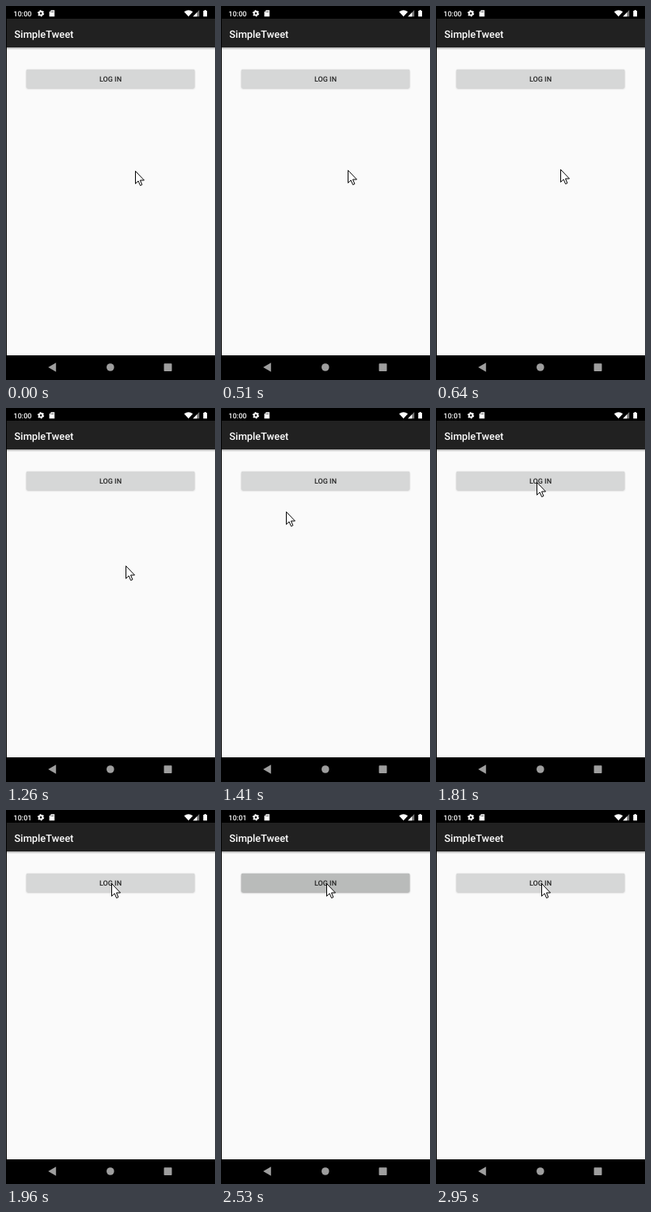
An HTML page for the animation above (8000 ms loop, 264 px wide and 470 px high).

```html
<!DOCTYPE html>
<html lang="en">
<head>
<meta charset="utf-8">
<title>Login screen</title>
<style>
  html, body { margin: 0; width: 100%; height: 100%; overflow: hidden; background: #000; }
  svg { display: block; width: 100%; height: 100%; }
  text { font-family: Roboto, sans-serif; font-weight: 500; text-rendering: geometricPrecision; }
</style>
</head>
<body>
<svg viewBox="0 0 264 470">
  <defs>
    <linearGradient id="barShadow" x2="0" y2="1">
      <stop stop-color="#000" stop-opacity=".32"/>
      <stop offset="1" stop-color="#000" stop-opacity="0"/>
    </linearGradient>
    <filter id="blur" x="-10%" y="-50%" width="120%" height="200%">
      <feGaussianBlur stdDeviation="1"/>
    </filter>
  </defs>

  <rect width="264" height="470"/>
  <rect x="1" y="52" width="263" height="387" fill="#fafafa"/>
  <rect x="1" y="16" width="263" height="36" fill="#212121"/>
  <rect x="1" y="52" width="263" height="3" fill="url(#barShadow)"/>

  <!-- status bar -->
  <g fill="#fff">
    <text id="clock" x="9.6" y="12.6" font-size="9"></text>
    <circle cx="44" cy="9.3" r="2.3" fill="none" stroke="#fff" stroke-width="1.9"/>
    <circle cx="44" cy="9.3" r="3.6" fill="none" stroke="#fff" stroke-width="1.2" stroke-dasharray="1.9 1.87"/>
    <path d="M57 5.3h4.3v7.9h-6.6v-5.4z"/>
    <path d="M56.8 6.6v1.6M58.3 6.6v1.6M59.8 6.6v1.6" stroke="#000" stroke-width=".6"/>
    <path d="M225 7.2Q230.5 3.2 236 7.2L230.5 13.3z"/>
    <path d="M244.2 5v8.2h-8z" fill="#777"/>
    <path d="M241.3 8v5.2h-5.1z"/>
    <path d="M249.2 6h1.4v-1h2v1h1.4v7.3h-4.8z"/>
    <text x="10.6" y="39.8" font-size="12.85">SimpleTweet</text>
  </g>

  <!-- button -->
  <rect id="shadow" x="26" y="80.8" width="212" height="23" rx="1.3" filter="url(#blur)"/>
  <rect id="button" x="25.7" y="79.7" width="212.6" height="23.3" rx="1.3"/>
  <text x="132" y="94.6" font-size="9" fill="#222" text-anchor="middle">LOG IN</text>

  <!-- navigation bar -->
  <g fill="#9e9e9e">
    <path d="M53.3 454L63.2 448.3v11.4z"/>
    <circle cx="131.8" cy="454" r="4.8"/>
    <rect x="199.5" y="449.2" width="10" height="9.8" rx=".7"/>
  </g>

  <path id="cursor" d="M.5.5v15.8l3.6-3.4 2.5 5.7 2.3-1-2.4-5.6h5z" fill="#fff" stroke="#000" stroke-width="1"/>
</svg>
<script>
  const LOOP = 8000;
  const el = id => document.getElementById(id);

  // Each entry: start time in ms, then the values held from then on
  const cursorSteps = [
    [0, 163, 207], [510, 160, 206], [640, 157, 205], [1260, 151, 198],
    [1410, 82, 130], [1560, 84, 115], [1690, 106, 103], [1810, 127, 93], [1960, 133, 92]
  ];
  const clockSteps = [[0, '10:00'], [1560, '10:01']];
  const buttonSteps = [
    [0, '#d6d7d7', .25], [2530, '#b9bbba', .45], [2800, '#c8c9c8', .35], [2950, '#d6d7d7', .25]
  ];

  const valuesAt = (steps, t) => steps.findLast(([start]) => start <= t).slice(1);

  function draw(t) {
    const [x, y] = valuesAt(cursorSteps, t);
    const [color, shade] = valuesAt(buttonSteps, t);
    el('cursor').setAttribute('transform', `translate(${x} ${y})`);
    el('clock').textContent = valuesAt(clockSteps, t)[0];
    el('button').setAttribute('fill', color);
    el('shadow').setAttribute('opacity', shade);
  }

  const startTime = performance.now();
  function frame() {
    draw((performance.now() - startTime) % LOOP);
    requestAnimationFrame(frame);
  }
  frame();
</script>
</body>
</html>
```
